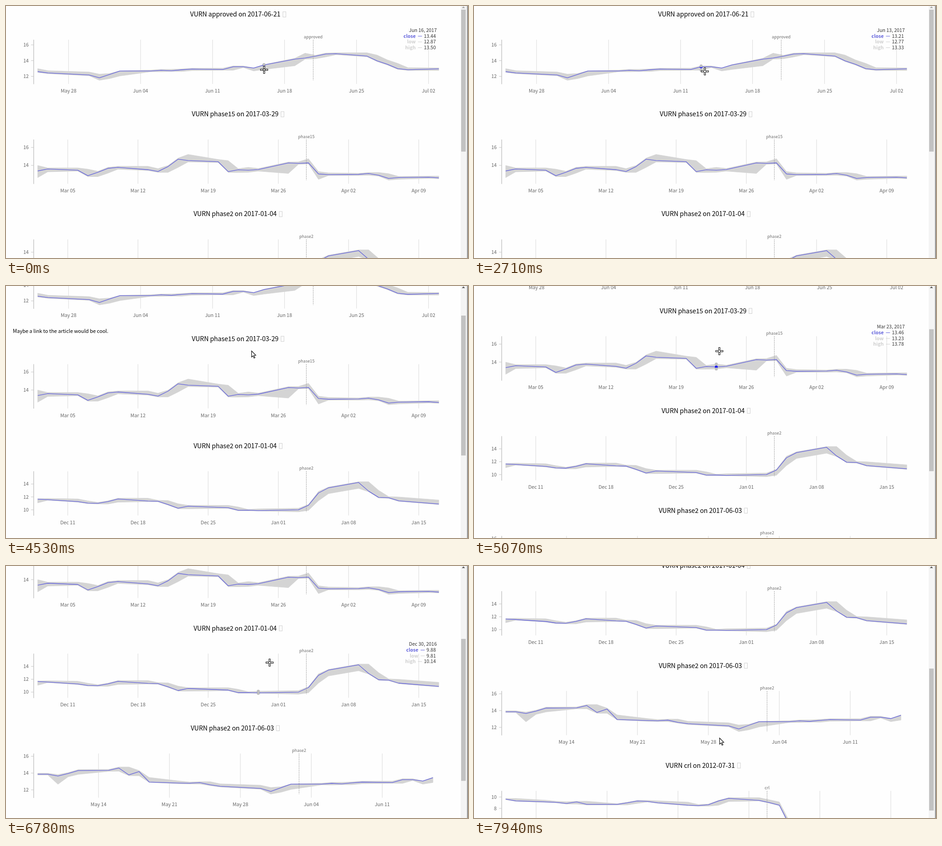
Animation of 1013 by 553 pixels, one loop 8000 ms. Source, as an HTML page with a canvas:

```html
<!DOCTYPE html>
<html lang="en">
<head>
<meta charset="utf-8">
<title>Price charts</title>
<style>
  html, body { margin: 0; width: 100%; height: 100%; overflow: hidden; background: #fefefe; }
  canvas { display: block; width: 1013px; height: 553px; }
</style>
</head>
<body>
<canvas id="stage"></canvas>
<script>
const W = 1013, H = 553, LOOP = 8000, DAY = 864e5;
const PITCH = 219.1, LEFT = 69.5, PLOT = 879.5, TOP = 76.6, BOTTOM = 163;
const NOTCH = 45.7, NOTE_GAP = 16;
const FONT = '"Noto Sans CJK JP", "Noto Sans CJK SC", "Noto Sans CJK TC", "Noto Sans CJK KR", "Noto Sans CJK", "Noto Sans", sans-serif';
const MONTHS = 'Jan Feb Mar Apr May Jun Jul Aug Sep Oct Nov Dec'.split(' ');
const HOLIDAYS = ['2016-12-26', '2017-01-02', '2017-01-16', '2017-05-29'].map(Date.parse);
const BLUE = '#6262dc', BAND = '#d4d4d4';

const canvas = document.getElementById('stage');
const dpr = window.devicePixelRatio || 1;
canvas.width = W * dpr;
canvas.height = H * dpr;
const g = canvas.getContext('2d');

// Low and high of the days that leave the usual range
const swings = {
  '2012-08-02': [4.8, 5.7],
  '2016-12-08': [11.07, 11.73], '2016-12-30': [9.81, 10.14],
  '2017-01-03': [9.68, 10.24], '2017-01-05': [11.4, 12.85],
  '2017-03-02': [12.64, 13.99], '2017-03-17': [14.38, 15.22], '2017-03-23': [13.23, 13.78],
  '2017-03-27': [13.1, 14.38], '2017-03-29': [14.15, 14.74], '2017-03-30': [12.44, 13.31],
  '2017-04-06': [12.36, 13.08],
  '2017-05-10': [12.66, 13.82], '2017-05-19': [12.88, 13.48], '2017-05-31': [11.5, 12.28],
  '2017-06-02': [12.05, 12.71], '2017-06-15': [12.68, 13.07], '2017-06-16': [12.87, 13.5],
  '2017-06-20': [14.18, 14.94],
};

// One row per trading day; a day usually spans from the last close to its own
function series(first, closes) {
  let day = Date.parse(first) - DAY;
  return closes.map((close, i) => {
    do day += DAY; while (new Date(day).getUTCDay() % 6 === 0 || HOLIDAYS.includes(day));
    const last = closes[i - 1] || close;
    const usual = [Math.min(last, close) - .1, Math.max(last, close) + .12];
    const [low, high] = swings[new Date(day).toISOString().slice(0, 10)] || usual;
    return { day, close, low, high };
  });
}

const early = series('2012-07-05', [
  9.63, 9.32, 9.14, 9.06, 8.86, 9.14, 8.7, 8.71, 8.98, 9.3, 9.22, 8.98, 8.57, 8.49, 8.65, 9.3,
  9.77, 9.4, 9.02, 8.57, 5.1, 4.05]);
const winter = series('2016-12-08', [
  11.65, 11.57, 11.27, 11.04, 11, 11.28, 11.68, 11.36, 11.32, 10.82, 10.25, 10.57, 10.32, 9.93,
  9.94, 9.88, 10, 10.71, 12.61, 13.42, 14.24, 12.9, 11.93, 11.87, 11.4, 10.9]);
const spring = series('2017-03-02', [
  13.38, 13.6, 13.46, 12.85, 13.23, 13.67, 13.78, 13.52, 13.32, 13.87, 14.69, 14.54, 14.41, 13.31,
  13.51, 13.46, 13.54, 14.27, 14.22, 14.28, 13.05, 12.97, 13, 13.09, 12.9, 12.55, 12.65, 12.69, 12.61]);
const summer = series('2017-05-08', [
  13.86, 13.86, 13.65, 13.94, 14.3, 14.32, 14.6, 13.78, 14.18, 12.93, 12.81, 12.79, 12.86, 12.6,
  12.43, 12.17, 11.81, 12.25, 12.68, 12.68, 12.77, 12.71, 12.83, 12.92, 12.87, 13.21, 13.21, 13.05,
  13.44, 14.18, 14.33, 14.56, 14.84, 14.88, 14.58, 13.97, 13.53, 12.98, 12.84, 12.95]);

const charts = [
  { event: 'approved', date: '2017-06-21', data: summer, first: '2017-05-25', span: 39, mid: 502.7 },
  { event: 'phase15', date: '2017-03-29', data: spring, first: '2017-03-02', span: 40, mid: 502.4 },
  { event: 'phase2', date: '2017-01-04', data: winter, first: '2016-12-08', span: 40, mid: 502.4 },
  { event: 'phase2', date: '2017-06-03', data: summer, first: '2017-05-08', span: 39.58, mid: 496.2 },
  { event: 'crl', date: '2012-07-31', data: early, first: '2012-07-05', span: 39.58, mid: 496.2 },
];
for (const c of charts) {
  c.start = Date.parse(c.first);
  c.rows = c.data.filter(r => r.day >= c.start && r.day <= c.start + c.span * DAY);
  c.min = Math.min(...c.rows.map(r => r.low));
  c.max = Math.max(...c.rows.map(r => r.high)) * 1.1;
  c.x = day => LEFT + (day - c.start) / DAY * PLOT / c.span;
  c.y = price => BOTTOM + (price - c.min) / (c.max - c.min) * (TOP - BOTTOM);
}

// Wheel gestures: start, length, notches
const wheel = [[3180, 520, 2], [4345, 530, 2], [5350, 388, 3], [6960, 480, 3]];
// Pointer path: time, x, y
const path = [
  [560, 566, 140], [920, 470, 174], [1550, 279, 147], [1780, 235, 151], [2270, 347, 146],
  [2810, 538, 143], [5960, 538, 143], [6230, 556, 141], [6410, 554, 140], [6770, 578, 212],
  [7400, 578, 212], [7850, 538, 388], [7940, 538, 378],
];
// From this time on: hovered chart, chart whose note is open (-1 for none)
const phases = [
  [0, 0, -1], [3980, -1, 1], [5070, 1, -1], [6060, -1, 2], [6690, 2, -1],
  [7530, -1, 3], [7620, 3, -1], [7800, -1, -1],
];

const clamp = u => Math.max(0, Math.min(1, u));
const scrollAt = t => wheel.reduce((sum, [t0, len, n]) => sum + n * NOTCH * clamp((t - t0) / len), 0);

function pointerAt(t) {
  const i = path.findIndex(p => p[0] > t);
  const b = path.at(i), a = i > 0 ? path[i - 1] : b;
  const u = a === b ? 0 : (t - a[0]) / (b[0] - a[0]);
  return [1, 2].map(j => a[j] + (b[j] - a[j]) * u);
}

function text(str, x, y, size, color, align = 'left', weight = 400) {
  g.font = `${weight} ${size}px ${FONT}`;
  g.fillStyle = color;
  g.textAlign = align;
  g.fillText(str, x, y);
  return g.measureText(str).width;
}

function line(x1, y1, x2, y2, color, width = 1, dash = []) {
  g.strokeStyle = color;
  g.lineWidth = width;
  g.setLineDash(dash);
  g.beginPath();
  g.moveTo(x1, y1);
  g.lineTo(x2, y2);
  g.stroke();
  g.setLineDash([]);
}

function dot(x, y, color) {
  g.fillStyle = color;
  g.beginPath();
  g.arc(x, y, 3.2, 0, 7);
  g.fill();
}

function trace(c, rows, key) {
  for (const r of rows) g.lineTo(c.x(r.day), c.y(r[key]));
}

function drawChart(c) {
  const width = text(`VURN ${c.event} on ${c.date}`, c.mid, 23.2, 14, '#000', 'center');
  g.lineWidth = 1;
  g.strokeStyle = '#cfcfcf';
  g.strokeRect(c.mid + width / 2 + 5.5, 12.7, 6.5, 11.5);

  for (let d = 0; d <= c.span; d++) {
    const date = new Date(c.start + d * DAY);
    if (date.getUTCDay()) continue;
    const x = c.x(+date);
    line(x, 74, x, 171, '#dfdfdf', 1.2);
    const label = MONTHS[date.getUTCMonth()] + ' ' + String(date.getUTCDate()).padStart(2, '0');
    text(label, x, 190, 10.7, '#666', 'center');
  }
  line(60.7, 74, 60.7, 171.5, '#bdbdbd', 1.3);
  for (let v = 2 * Math.ceil(c.min / 2); v < c.max; v += 2) {
    line(55, c.y(v), 60.7, c.y(v), '#c4c4c4');
    text(v, 49.8, c.y(v) + 3.7, 10.7, '#666', 'right');
  }

  g.beginPath();
  trace(c, c.rows, 'high');
  trace(c, [...c.rows].reverse(), 'low');
  g.closePath();
  g.fillStyle = g.strokeStyle = BAND;
  g.lineWidth = .8;
  g.fill();
  g.stroke();

  g.beginPath();
  trace(c, c.rows, 'close');
  g.strokeStyle = BLUE;
  g.lineWidth = 1.3;
  g.lineJoin = 'round';
  g.stroke();

  const mark = c.x(Date.parse(c.date) - .21 * DAY);
  line(mark, 74, mark, 163, '#989898', 1, [2.5, 1.5]);
  text(c.event, mark, 70.8, 9.2, '#6c6c6c', 'center');
}

function drawHover(c, pointerX) {
  const gap = r => Math.abs(c.x(r.day) - pointerX);
  const row = c.rows.reduce((a, b) => gap(b) < gap(a) ? b : a);
  const x = c.x(row.day), date = new Date(row.day);
  dot(x, c.y(row.close), '#1515ee');
  dot(x, c.y(row.low), '#bebebe');
  dot(x, c.y(row.high), '#bebebe');

  const day = String(date.getUTCDate()).padStart(2, ' ');
  text(`${MONTHS[date.getUTCMonth()]} ${day}, ${date.getUTCFullYear()}`, 944.5, 56.8, 10.5, '#333', 'right');
  ['close', 'low', 'high'].forEach((key, i) => {
    const y = 69.8 + i * 12.6, color = i ? '#cfcfcf' : BLUE;
    const left = 942.5 - text(row[key].toFixed(2), 942.5, y, 10.5, '#333', 'right');
    line(left - 13, y - 3.6, left - 4, y - 3.6, color);
    text(key, left - 18, y, 10.5, color, 'right', 700);
  });
}

function drawScrollbar(scroll, open) {
  g.fillStyle = '#f4f4f4';
  g.fillRect(997, 0, 13, H);
  g.fillStyle = '#c2c2c2';
  g.fillRect(998, 8 + scroll * (open ? .468 : .475), 10, open ? 307 : 311.5);
  g.fillStyle = scroll ? '#505050' : '#a3a3a3';
  g.beginPath();
  g.moveTo(1003, 1);
  g.lineTo(1006.5, 4.5);
  g.lineTo(999.5, 4.5);
  g.fill();
  g.fillStyle = '#555';
  g.fillRect(1011, 0, 1.3, H);
}

function drawPointer(x, y, cross) {
  g.save();
  g.translate(x, y);
  if (cross) {
    for (let i = 0; i < 4; i++) {
      line(2, 0, 8.5, 0, '#000', 4);
      line(3, 0, 7.5, 0, '#fff', 2);
      g.rotate(Math.PI / 2);
    }
  } else {
    g.beginPath();
    [[.5, -.5], [.5, 13], [3.6, 10.2], [5.8, 15.3], [7.9, 14.4], [5.8, 9.4], [9.8, 9]]
      .forEach(p => g.lineTo(...p));
    g.closePath();
    g.fillStyle = '#fff';
    g.strokeStyle = '#111';
    g.lineWidth = 1.2;
    g.fill();
    g.stroke();
  }
  g.restore();
}

function draw(t) {
  // The screen refreshes in steps of 90 ms
  const tick = 650 + Math.floor((t - 640) / 90) * 90;
  const scroll = scrollAt(tick);
  const [px, py] = pointerAt(tick);
  const [, hover, note] = phases.findLast(p => p[0] <= t);

  g.setTransform(dpr, 0, 0, dpr, 0, 0);
  g.fillStyle = '#fefefe';
  g.fillRect(0, 0, W, H);
  charts.forEach((c, i) => {
    g.save();
    g.translate(0, i * PITCH - scroll + (note >= 0 && i > note ? NOTE_GAP : 0));
    drawChart(c);
    if (i === hover) drawHover(c, px);
    if (i === note) text('Maybe a link to the article would be cool.', 15, 5.6, 11.05, '#000');
    g.restore();
  });
  drawScrollbar(scroll, note >= 0);
  drawPointer(px, py, hover >= 0);
}

const begin = performance.now();
function loop() {
  draw((performance.now() - begin) % LOOP);
  requestAnimationFrame(loop);
}
loop();
</script>
</body>
</html>
```
